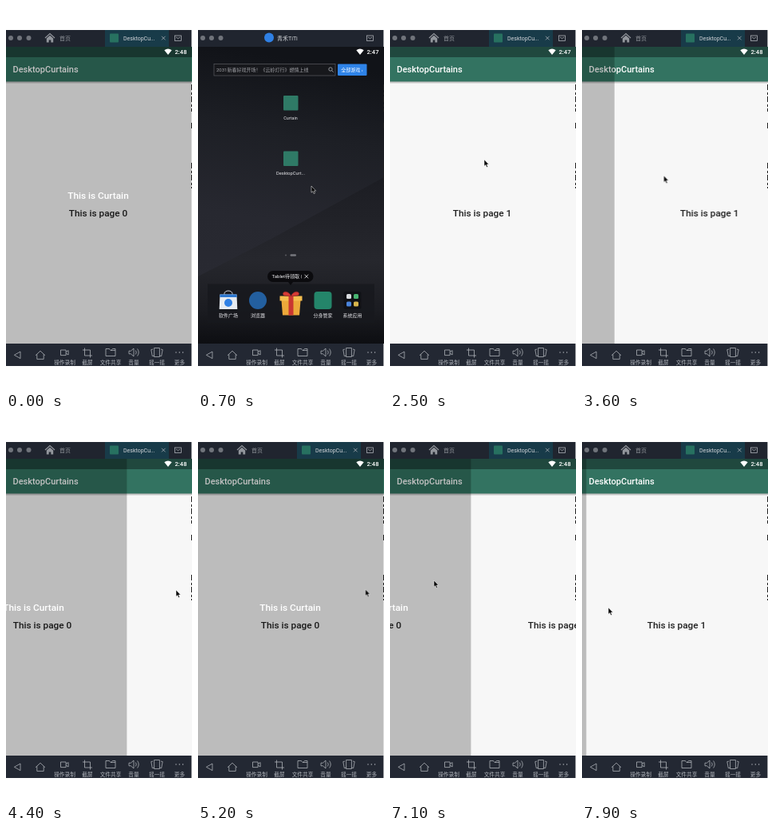
These frames come from a looping animation (233x480 px, 8 s). An HTML page:

```html
<!DOCTYPE html>
<html lang="zh-CN">
<head>
<meta charset="utf-8">
<title>Page swipe</title>
<style>
html, body { margin: 0; width: 100%; height: 100%; overflow: hidden; background: #fff; }
svg { display: block; width: 100vw; height: 100vh; }
text { font-family: Roboto, "Noto Sans CJK SC", "Noto Sans CJK", sans-serif; }
.mid { text-anchor: middle; }
.bar { font-size: 7px; fill: #d3d6da; }
.tool text { font-size: 6.7px; fill: #b0b4bb; text-anchor: middle; }
.line { fill: none; stroke: #b4b8be; stroke-width: .75; }
.label { font-size: 6px; fill: #e6e6ea; text-anchor: middle; }
.big { font-size: 11.8px; font-weight: 500; text-anchor: middle; }

/* Every motion advances in steps of 100 ms. */
.pager, .drape, .cursor, .home, .app, .early, .late { animation: 8s step-end infinite; }
.pager { animation-name: pager; }
.drape { animation-name: drape; }
.cursor { animation-name: cursor; }
.home { animation-name: home; }
.app { animation-name: app; }
.early { animation-name: early; }
.late { animation-name: late; }

@keyframes pager {
  0% { transform: translateX(0); }
  1.25% { transform: translateX(-232px); }
  41.25% { transform: translateX(-232px); animation-timing-function: steps(11); }
  55% { transform: translateX(-70px); animation-timing-function: steps(4); }
  60% { transform: translateX(0); }
  80% { transform: translateX(0); animation-timing-function: steps(7); }
  88.75% { transform: translateX(-138px); animation-timing-function: steps(5); }
  95% { transform: translateX(-212px); animation-timing-function: steps(3); }
  98.75%, 100% { transform: translateX(-229px); }
}
@keyframes drape {
  0% { transform: translateX(0); }
  1.25% { transform: translateX(-233px); }
  41.25% { transform: translateX(-233px); animation-timing-function: steps(11); }
  55% { transform: translateX(-81px); animation-timing-function: steps(4); }
  60% { transform: translateX(0); }
  80% { transform: translateX(0); animation-timing-function: steps(7); }
  88.75% { transform: translateX(-131px); animation-timing-function: steps(5); }
  95% { transform: translateX(-208px); animation-timing-function: steps(3); }
  98.75%, 100% { transform: translateX(-227px); }
}
@keyframes cursor {
  0% { transform: translate(150px, 236px); opacity: 0; }
  1.25% { transform: translate(150px, 236px); opacity: 1; }
  6.25% { transform: translate(150px, 236px); opacity: 1; animation-timing-function: steps(8); }
  16.25% { transform: translate(118px, 192px); opacity: 1; }
  32.5% { transform: translate(119px, 192px); opacity: 1; animation-timing-function: steps(6); }
  40% { transform: translate(61px, 211px); opacity: 1; }
  41.25% { transform: translate(61px, 211px); opacity: 1; animation-timing-function: steps(11); }
  55% { transform: translate(213px, 215px); opacity: 1; }
  63.75% { transform: translate(213px, 215px); opacity: 1; animation-timing-function: steps(6); }
  71.25% { transform: translate(193px, 210px); opacity: 1; }
  80% { transform: translate(193px, 210px); opacity: 1; animation-timing-function: steps(7); }
  88.75% { transform: translate(55px, 203px); opacity: 1; animation-timing-function: steps(5); }
  95% { transform: translate(30px, 222px); opacity: 1; animation-timing-function: steps(3); }
  98.75%, 100% { transform: translate(33px, 237px); opacity: 1; }
}
@keyframes home { 0% { opacity: 0; } 1.25% { opacity: 1; } 25%, 100% { opacity: 0; } }
@keyframes app { 0% { opacity: 1; } 1.25% { opacity: 0; } 25%, 100% { opacity: 1; } }
@keyframes early { 0% { opacity: 0; } 1.25% { opacity: 1; } 43.75%, 100% { opacity: 0; } }
@keyframes late { 0% { opacity: 1; } 1.25% { opacity: 0; } 43.75%, 100% { opacity: 1; } }
</style>
</head>
<body>
<svg viewBox="0 0 233 480" preserveAspectRatio="none">
  <defs>
    <clipPath id="screen"><rect y="51" width="232.4" height="371"/></clipPath>
    <linearGradient id="wall" x1=".1" y1="0" x2="0" y2="1">
      <stop offset="0" stop-color="#111318"/>
      <stop offset=".25" stop-color="#1d1f25"/>
      <stop offset=".55" stop-color="#272830"/>
      <stop offset="1" stop-color="#2a2b33"/>
    </linearGradient>
    <linearGradient id="slope" x2="0" y2="1">
      <stop offset="0" stop-color="#1c1d23"/>
      <stop offset=".5" stop-color="#26272d"/>
      <stop offset=".8" stop-color="#1b1c21"/>
      <stop offset="1" stop-color="#0d0e12"/>
    </linearGradient>
    <linearGradient id="shade" x2="0" y2="1">
      <stop offset="0" stop-color="#000" stop-opacity=".3"/>
      <stop offset="1" stop-color="#000" stop-opacity="0"/>
    </linearGradient>
  </defs>

  <rect width="233" height="480" fill="#fff"/>

  <!-- Window title bar -->
  <rect y="30" width="232.4" height="21" fill="#20252f"/>
  <g fill="#70747b">
    <circle cx="6" cy="40" r="3"/><circle cx="17" cy="40" r="3"/><circle cx="28.5" cy="40" r="3"/>
  </g>
  <g class="line"><rect x="211.5" y="37" width="8" height="6.5"/><path d="M213 38.8l2.5 2 2.5-2"/></g>

  <g class="app">
    <path d="M49 40l6-5.5 6 5.5" fill="none" stroke="#92969c" stroke-width="1.2"/>
    <path d="M50.8 40.6l4.2-3.9 4.2 3.9v5h-2.9v-3h-2.6v3h-2.9z" fill="#92969c"/>
    <text class="bar" x="67" y="42.8" style="fill:#8f9399">首页</text>
    <rect x="124" y="30" width="80" height="21" fill="#183b49"/>
    <rect x="130" y="34.5" width="11" height="11" rx="1" fill="#277160"/>
    <text class="bar" x="147" y="42.6">DesktopCu...</text>
    <path class="line" d="M195 37.8l4.6 4.6m0-4.6l-4.6 4.6"/>
  </g>
  <g class="home">
    <circle cx="89" cy="39.5" r="6" fill="#2f80e4"/>
    <text class="bar" x="99" y="42.5">青禾TiTi</text>
  </g>

  <g clip-path="url(#screen)">
    <g class="app">
      <rect y="51" width="233" height="371" fill="#f7f7f7"/>
      <rect y="51" width="233" height="13" fill="#20483e"/>
      <rect y="64" width="233" height="30.5" fill="#337361"/>
      <rect y="94.5" width="233" height="3" fill="url(#shade)"/>
      <text x="8.5" y="83" font-size="11" font-weight="500" fill="#fff">DesktopCurtains</text>
      <g class="pager" fill="#202020">
        <text class="big" x="115.5" y="263">This is page 0</text>
        <text class="big" x="347.5" y="263">This is page 1</text>
      </g>
      <g class="drape">
        <rect y="51" width="232.4" height="371" fill="#000" fill-opacity=".24"/>
        <text class="big" x="115.5" y="241" fill="#fff">This is Curtain</text>
      </g>
    </g>

    <!-- Home screen -->
    <g class="home">
      <rect y="51" width="233" height="371" fill="url(#wall)"/>
      <path d="M0 338L90 292 233 214V422H0z" fill="url(#slope)"/>
      <rect x="20" y="72.5" width="152" height="14.5" fill="#17181c" stroke="#5a5b60" stroke-width=".7"/>
      <text x="23" y="82" font-size="6" fill="#a2a3a8">2031新春好戏开场！《云岭灯行》燃情上线</text>
      <g class="line"><circle cx="166" cy="79" r="2.2"/><path d="M167.7 80.7l2 2"/></g>
      <rect x="175" y="72.5" width="36.5" height="14.5" rx="1" fill="#2e83e8"/>
      <text class="mid" x="193" y="82" font-size="6" fill="#fff">全部游戏 ›</text>

      <rect x="107" y="112" width="18.5" height="18.5" rx="1" fill="#2f7a66"/>
      <text class="label" x="116" y="142" style="font-size:5.4px">Curtain</text>
      <rect x="107" y="181.5" width="18.5" height="18.5" rx="1" fill="#2f7a66"/>
      <text class="label" x="116" y="211.3" style="font-size:5.7px">DesktopCurt...</text>

      <circle cx="110" cy="311.5" r="1.1" fill="#55565c"/>
      <rect x="115.5" y="310.3" width="7.5" height="2.4" rx="1.2" fill="#77787e"/>

      <rect x="12" y="347.5" width="209" height="48.5" fill="#17181d" fill-opacity=".8"/>
      <rect x="87" y="331" width="57.5" height="14" rx="7" fill="#0b0b0e"/>
      <path d="M113 345h6l-3 4z" fill="#0b0b0e"/>
      <text x="92.5" y="340.3" font-size="6" fill="#f0f0f2">Tablet待领取 |</text>
      <path d="M133.5 335.7l4.6 4.6m0-4.6l-4.6 4.6" stroke="#f0f0f2" stroke-width=".8"/>

      <path d="M33 361v-1.5a5 3.5 0 0 1 10 0v1.5" fill="none" stroke="#c9ced6" stroke-width="1"/>
      <path d="M27.5 360.5h21l.8 18.5H26.7z" fill="#e6ebf1"/>
      <path d="M27.5 360.5h21l.2 3.5H27.3z" fill="#2d77cf"/>
      <circle cx="38" cy="371" r="5" fill="#2f80e4"/>
      <circle cx="75" cy="368" r="11" fill="#235f9f"/>
      <g>
        <path d="M104.5 368h24l-1.5 18.5h-21z" fill="#eca83a"/>
        <path d="M102.5 362.5h28v6h-28z" fill="#f4bd4e"/>
        <path d="M113.5 362.5h6v24h-6z" fill="#c93631"/>
        <path d="M116.5 362.5c-3-7-11-6.5-10-2 .7 2 6 2 10 2zm0 0c3-7 11-6.5 10-2-.7 2-6 2-10 2z" fill="#d63b35" stroke="#8f2224" stroke-width=".6"/>
      </g>
      <rect x="145.5" y="357" width="22" height="22" rx="4" fill="#24856a"/>
      <rect x="182.5" y="357" width="22" height="22" rx="3" fill="#101116"/>
      <g>
        <rect x="186" y="360" width="6" height="6" rx="1.5" fill="#d9dce0"/>
        <rect x="195" y="360" width="6" height="6" rx="1.5" fill="#48b471"/>
        <rect x="186" y="369.5" width="6" height="6" rx="1.5" fill="#4a84dd"/>
        <rect x="195" y="369.5" width="6" height="6" rx="1.5" fill="#d7b54c"/>
      </g>
      <text class="label" x="38" y="388.5">软件广场</text>
      <text class="label" x="75" y="388.5">浏览器</text>
      <text class="label" x="156.5" y="388.5">分身管家</text>
      <text class="label" x="193.5" y="388.5">系统应用</text>
    </g>

    <!-- Status icons stay above the drape -->
    <path d="M198.3 55.2q4.7-3.6 9.4 0l-4.7 5.9z" fill="#fff"/>
    <g font-size="7.6" font-weight="500" fill="#fff">
      <text class="early" x="211.5" y="60.3">2:47</text>
      <text class="late" x="211.5" y="60.3">2:48</text>
    </g>
  </g>

  <!-- Bottom tools -->
  <rect y="422" width="232.4" height="28" fill="#232833"/>
  <g class="line">
    <path d="M18 432v8.6l-7.6-4.3z"/>
    <path d="M37 436.8l6-5.6 6 5.6m-10.2-1.4v6h8.4v-6"/>
    <path d="M68.5 430h6.6v6.6h-6.6zM75.1 432.4l3-1.8v5.4l-3-1.8"/>
    <path d="M98.5 427.5v9.5h9.5M96 430h9.5v9.5"/>
    <path d="M125 437.5v-9h4.5l1.5 2h6v7zM131.5 430.5l2-2h3.5v2"/>
    <path d="M154 431.2h2.4l3.6-3.2v10l-3.6-3.2H154zM162.4 430.5q1.8 2.5 0 5M164.6 428.5q3.2 4.5 0 9"/>
    <path d="M185.6 427.5h6.8v11h-6.8zM184 429l-2.2.6 1.5 8 2.5-.4M194 429l2.2.6-1.5 8-2.5-.4"/>
  </g>
  <g fill="#b4b8be">
    <circle cx="213" cy="433" r=".7"/><circle cx="217.3" cy="433" r=".7"/><circle cx="221.6" cy="433" r=".7"/>
  </g>
  <g class="tool">
    <text x="73.5" y="448">操作录制</text>
    <text x="102" y="448">截屏</text>
    <text x="131" y="448">文件共享</text>
    <text x="160" y="448">音量</text>
    <text x="189" y="448">摇一摇</text>
    <text x="217.5" y="448">更多</text>
  </g>

  <!-- Edge of a window behind -->
  <path d="M232.5 98V132M232.5 146V153M232.5 196V228" stroke="#222" stroke-dasharray="7 3 3 2"/>

  <g class="cursor">
    <path d="M0 0v8.2l1.8-1.6 1.3 3 1.4-.6-1.3-2.9h2.5z" fill="#050505" stroke="#fff" stroke-width=".5"/>
  </g>
</svg>
</body>
</html>
```
